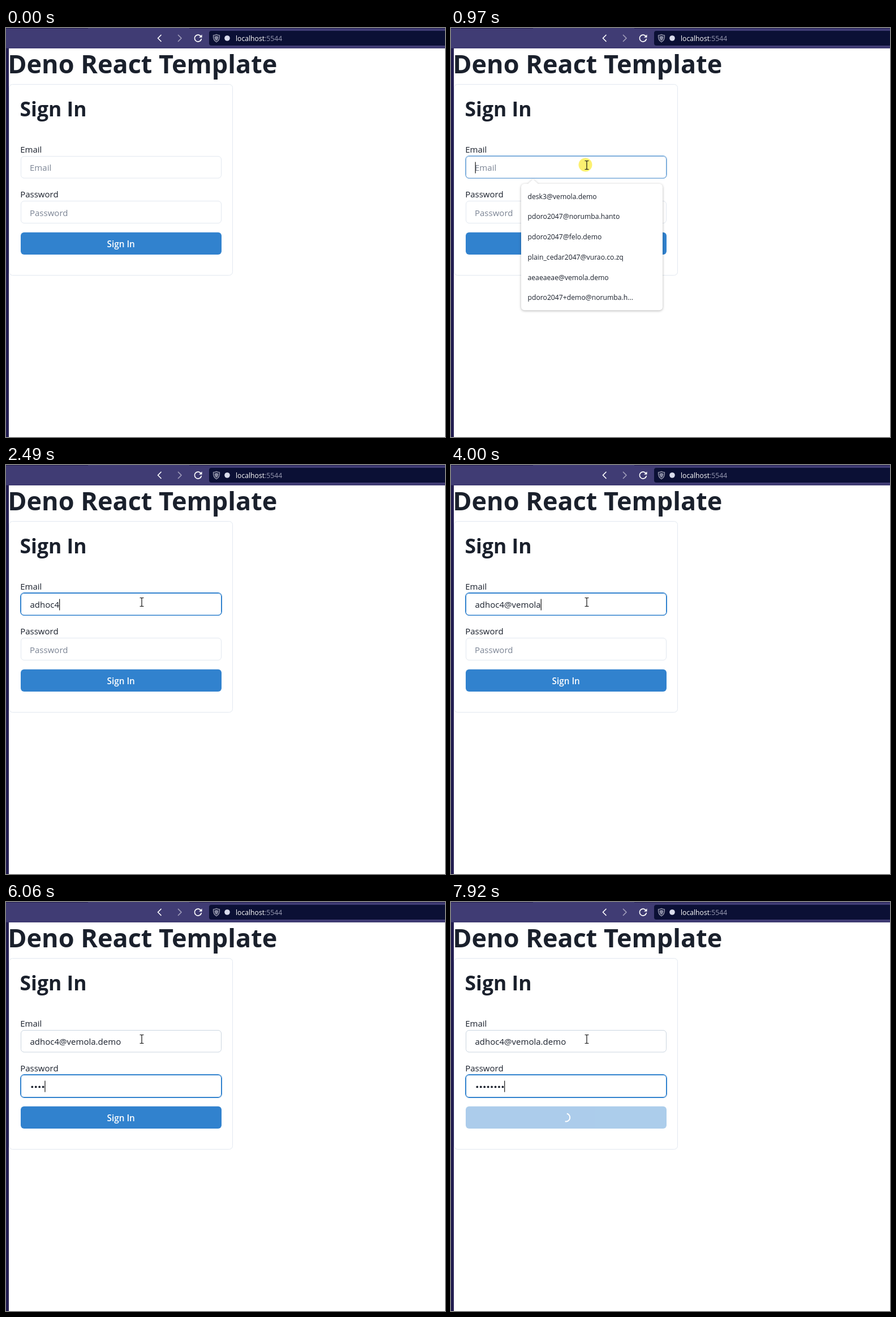
An HTML page that plays this animation: 776 by 722 pixels, repeating every 7990 ms.

```html
<!DOCTYPE html>
<html lang="en">
<head>
<meta charset="utf-8">
<title>Sign in form</title>
<style>
  html, body { margin: 0; width: 100%; height: 100%; overflow: hidden; background: #fff; }
  svg { display: block; width: 776px; height: 722px; }
  text { font-family: "Open Sans", "Noto Sans", sans-serif; font-size: 15px; fill: #1a202c; white-space: pre; }
  .bold { font-weight: 700; }
  .hint { fill: #7b8494; }
  .small { font-size: 12.2px; }
  .line { fill: none; stroke-linecap: round; stroke-linejoin: round; }
</style>
</head>
<body>
<svg viewBox="0 0 776 722" xmlns="http://www.w3.org/2000/svg">
  <rect width="776" height="722" fill="#fff"/>

  <!-- browser chrome -->
  <rect width="776" height="36" fill="#403c74"/>
  <path d="M0 0H145V1H0ZM324 0H776V1H324Z" fill="#221d50"/>
  <rect y="35" width="776" height="1" fill="#37336a"/>
  <rect y="36" width="5" height="686" fill="#221d50"/>
  <path class="line" d="M274 12.5L268.5 18L274 23.5" stroke="#fff" stroke-width="1.7"/>
  <path class="line" d="M304.5 12.5L310 18L304.5 23.5" stroke="#a09dba" stroke-width="1.7"/>
  <path class="line" d="M344.6 15A6 6 0 1 0 345.3 19.5" stroke="#fff" stroke-width="1.7"/>
  <path d="M346.5 11.5V16.8H341.2Z" fill="#fff"/>
  <path d="M363 5H776V31H363Q359 31 359 27V9Q359 5 363 5Z" fill="#0b1035"/>
  <path d="M372 11.5Q374.5 13 377.5 13Q378 21.5 372 24.8Q366 21.5 366.5 13Q369.5 13 372 11.5Z" fill="none" stroke="#a9abbd" stroke-width="1.2"/>
  <path d="M372 13.8Q374 15 375.6 15Q375.6 20.3 372 22.6Q368.4 20.3 368.4 15Q370 15 372 13.8Z" fill="#84879f"/>
  <circle cx="391" cy="18" r="4.8" fill="#d9dcec"/>
  <text class="small" x="406" y="23" style="fill:#fff">localhost<tspan fill="#9a9cb4">:5544</tspan></text>

  <!-- page -->
  <text class="bold" x="3.2" y="79.5" style="font-size:45px">Deno React Template</text>
  <rect x="5.5" y="99.5" width="395" height="337" rx="6" fill="#fff" stroke="#e2e8f0"/>
  <text class="bold" x="24.5" y="156" style="font-size:35.5px">Sign In</text>
  <text x="25.2" y="220">Email</text>
  <text x="25.2" y="299">Password</text>

  <g id="email">
    <rect x="25.5" y="225.5" width="356" height="40" rx="6.5" fill="none" stroke="#3182ce"/>
    <rect x="26.5" y="226.5" width="354" height="38.5" rx="5.5" fill="#fff"/>
  </g>
  <g id="pass">
    <rect x="25.5" y="304.5" width="356" height="41" rx="6.5" fill="none" stroke="#3182ce"/>
    <rect x="26.5" y="305.5" width="354" height="39" rx="5.5" fill="#fff"/>
  </g>
  <text id="emailHint" class="hint" x="42" y="252">Email</text>
  <text id="passHint" class="hint" x="42" y="331.5">Password</text>
  <text id="typed" x="42.5" y="252"></text>
  <g id="dots" fill="#1a202c"></g>
  <rect id="caret" width="1.1" height="20" fill="#000"/>

  <g id="button">
    <rect x="26" y="360.7" width="355" height="39.3" rx="6" fill="#3182ce"/>
    <text id="label" x="203.2" y="387" text-anchor="middle" style="fill:#fff;font-weight:600;font-size:15.3px">Sign In</text>
    <path id="spinner" d="M-4.95 -4.95A7 7 0 0 1 4.95 4.95" fill="none" stroke="#fff" stroke-width="2"/>
  </g>

  <g id="menu" style="filter:drop-shadow(0 1px 2px rgba(0,0,0,.3))">
    <path d="M135 276L145 267L155 276Z" fill="#fff"/>
    <rect id="panel" x="124" y="275" width="250" rx="6" fill="#fff"/>
    <g id="rows"></g>
  </g>

  <circle id="glow" cx="237.5" cy="241.5" r="12" fill="#fcf070"/>
  <path id="arrow" d="M0 0V16L3.8 12.5L6.3 18.2L8.8 17.1L6.3 11.5H11.5Z" fill="#fff" stroke="#000"/>
  <path id="beam" class="line" d="M-3 -7.5H-1Q0 -7.5 0 -6.5Q0 -7.5 1 -7.5H3M0 -6.5V6.5M-3 7.5H-1Q0 7.5 0 6.5Q0 7.5 1 7.5H3" stroke="#111" stroke-width="1.2"/>
</svg>
<script>
const LOOP = 7990, FRAME = 70;
const CLICK = 900, TAB = 5040, SUBMIT = 6940;
const EMAIL = "adhoc4@vemola.demo";
const EMAIL_KEYS = [1440, 1770, 2030, 2100, 2230, 2490, 2890, 3150, 3410,
  3540, 3610, 3740, 4000, 4130, 4400, 4600, 4670, 4940];
const PASS_KEYS = [5470, 5600, 5870, 6060, 6260, 6330, 6460, 6680];
const ALL = ["desk3@vemola.demo", "pdoro2047@norumba.hanto", "pdoro2047@felo.demo",
  "plain_cedar2047@vurao.co.zq", "aeaeaeae@vemola.demo", "pdoro2047+demo@norumba.h..."];
const MATCHES = ["aeaeaeae@vemola.demo", "alevo719354@felo.demo", "aluen_tornesta@norumba.hanto"];
const ROW = 35.7;

const $ = id => document.getElementById(id);
const set = (el, attrs) => { for (const k in attrs) el.setAttribute(k, attrs[k]); };
const show = (el, on) => { el.style.display = on ? "" : "none"; };
const clamp = v => Math.min(1, Math.max(0, v));
const easeOut = p => 1 - (1 - clamp(p)) ** 2;
const snap = (t, from) => from + Math.floor((t - from) / FRAME) * FRAME;
const count = (keys, t) => keys.filter(k => k <= t).length;
const mix = (a, b, p) => `rgb(${a.map((v, i) => Math.round(v + (b[i] - v) * p))})`;

const BLUE = [49, 130, 206], GRAY = [226, 232, 240], HOVER = [203, 213, 224];

function make(tag, parent, attrs) {
  const el = document.createElementNS("http://www.w3.org/2000/svg", tag);
  set(el, attrs);
  return parent.appendChild(el);
}

const dots = PASS_KEYS.map((_, i) =>
  make("circle", $("dots"), { cx: 46.3 + 6.45 * i, cy: 326.4, r: 1.9 }));
const rows = ALL.map((_, i) =>
  make("text", $("rows"), { class: "small", x: 135.5, y: 301.7 + ROW * i }));

function drawField(id, focus, base) {
  const [ring, box] = $(id).children;
  set(ring, { opacity: focus });
  set(box, { stroke: mix(base, BLUE, focus) });
}

function drawMenu(t) {
  const open = t >= CLICK && t < 1980;
  show($("menu"), open);
  if (!open) return;
  const list = t < 1500 ? ALL : MATCHES;
  const height = list.length * ROW + 9;
  const alpha = t < 1770 ? clamp(0.5 + (snap(t, CLICK) - CLICK) / 140)
                         : clamp(1 - (snap(t, 1770) - 1770) / 175);
  const scale = 0.94 + 0.06 * alpha, cy = 275 + height / 2;
  rows.forEach((row, i) => { row.textContent = list[i] || ""; });
  set($("panel"), { height });
  set($("menu"), {
    opacity: alpha,
    transform: `translate(249 ${cy}) scale(${scale}) translate(-249 ${-cy})`
  });
}

function drawPointer(t) {
  const u = easeOut((snap(t, 200) - 200) / 630), v = 1 - u;
  const path = (a, b, c) => v * v * a + 2 * u * v * b + u * u * c;
  const x = path(460, 270, 240), y = path(478, 330, 242);
  const inField = x < 381 && (y < 265 || (y > 305 && y < 345));
  show($("arrow"), t >= 200 && !inField);
  show($("beam"), t >= 200 && inField);
  for (const id of ["arrow", "beam"]) set($(id), { transform: `translate(${x} ${y})` });
  show($("glow"), t >= CLICK && t < 1090);
  return y < 265;
}

function drawText(t) {
  const letters = count(EMAIL_KEYS, t), marks = count(PASS_KEYS, t);
  const typed = $("typed");
  typed.textContent = EMAIL.slice(0, letters);
  show($("emailHint"), !letters);
  show($("passHint"), !marks);
  dots.forEach((dot, i) => show(dot, i < marks));

  const inPass = t >= TAB + 20;
  const width = inPass ? marks * 6.45 : letters ? typed.getComputedTextLength() : 0;
  const last = Math.max(CLICK, inPass ? TAB : 0,
    ...EMAIL_KEYS.concat(PASS_KEYS).filter(k => k <= t));
  set($("caret"), { x: 42.6 + width, y: inPass ? 315.5 : 236.5 });
  show($("caret"), t >= CLICK && (t - last) % 1060 < 530);
}

function drawButton(t) {
  const loading = t >= SUBMIT;
  const time = snap(t, SUBMIT);
  const fade = loading ? easeOut((time - SUBMIT + 22) / 200) : 0;
  set($("button"), { opacity: 1 - 0.6 * fade });
  show($("label"), !loading);
  show($("spinner"), loading);
  const angle = 35 + (time - SUBMIT) / 475 * 360;
  set($("spinner"), { transform: `translate(203.3 380.4) rotate(${angle})` });
}

function draw(t) {
  const hover = drawPointer(t);
  const focusIn = easeOut((t - 910) / 180), tabbed = easeOut((t - TAB) / 200);
  const swapped = t < TAB + 20 ? 0 : tabbed;
  drawField("email", focusIn * (1 - swapped), hover ? HOVER : GRAY);
  drawField("pass", swapped, GRAY);
  drawText(t);
  drawButton(t);
  drawMenu(t);
}

const start = performance.now();
function tick() {
  draw((performance.now() - start) % LOOP);
  requestAnimationFrame(tick);
}
tick();
</script>
</body>
</html>
```
